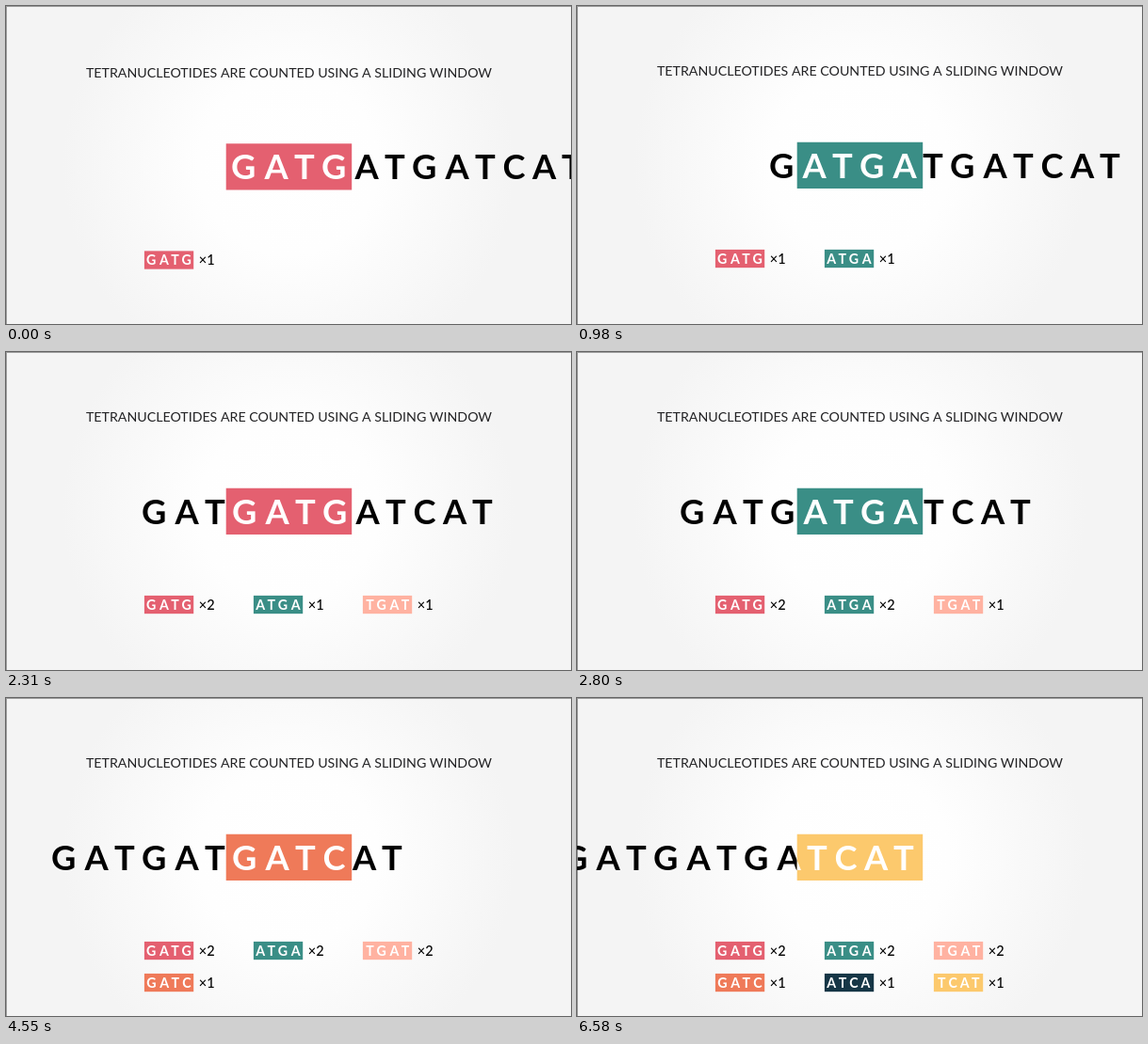
Recreate the animation shown at these times as an HTML page with a canvas. Size 600x338 px, loop 6650 ms.

```html
<!DOCTYPE html>
<html lang="en">
<head>
<meta charset="utf-8">
<title>Sliding window</title>
<style>
  html, body { margin: 0; width: 100%; height: 100%; overflow: hidden; background: #f4f4f4; }
  canvas { display: block; width: 600px; height: 338px; }
</style>
</head>
<body>
<canvas id="stage" width="600" height="338"></canvas>
<script>
const ctx = document.getElementById('stage').getContext('2d');
const LOOP = 6650;
const FIRST_MOVE = 329, STEP = 708, MOVE = 430, FADE = 500, TINT = 300;

const SEQUENCE = 'GATGATGATCAT';
// Centre of each letter, measured from the centre of the first one
const OFFSETS = [0, 35, 65, 96, 131, 161, 192, 227, 257, 288, 319.5, 349];
// Centre of the first letter while each window position is shown
const STOPS = [252, 217, 188, 157, 121, 92, 61, 25.5, -2];

const PINK = [228, 96, 112], TEAL = [58, 142, 134], PEACH = [255, 178, 161];
const ORANGE = [239, 122, 89], NAVY = [22, 54, 70], YELLOW = [252, 201, 109];
const TINTS = [PINK, TEAL, PEACH, PINK, TEAL, PEACH, ORANGE, NAVY, YELLOW];

const BOX = { x: 233.7, y: 144.7, w: 133.5, h: 49.2 };
const SMALL = 52.3 / BOX.w;
const LEGEND = [
  { first: 0, again: 3, x: 146.9, y: 258.9 },
  { first: 1, again: 4, x: 262.9, y: 258.9 },
  { first: 2, again: 5, x: 378.9, y: 258.9 },
  { first: 6, x: 146.9, y: 292.9 },
  { first: 7, x: 262.9, y: 292.9 },
  { first: 8, x: 378.9, y: 292.9 }
];

const BIG_FONT = '700 36.3px Lato, sans-serif';
const TITLE_FONT = '400 14.19px Lato, sans-serif';
const COUNT_FONT = '500 14.5px Lato, sans-serif';

const clamp = v => Math.min(1, Math.max(0, v));
const mix = (a, b, p) => a + (b - a) * p;
const ease = p => p < 0.5 ? 4 * p ** 3 : 1 - 4 * (1 - p) ** 3;
const rgb = c => `rgb(${c.map(Math.round).join()})`;

// Progress of the change into a given window position
function progress(t, state, length) {
  return state ? clamp((t - FIRST_MOVE - (state - 1) * STEP) / length) : 1;
}

function drawLetters(start, color, from = 0, to = SEQUENCE.length) {
  ctx.font = BIG_FONT;
  ctx.textAlign = 'left';
  ctx.fillStyle = color;
  for (let i = from; i < to; i++) {
    const m = ctx.measureText(SEQUENCE[i]);
    const middle = (m.actualBoundingBoxRight - m.actualBoundingBoxLeft) / 2;
    ctx.fillText(SEQUENCE[i], start + OFFSETS[i] - middle, 183);
  }
}

function drawBackground() {
  const g = ctx.createRadialGradient(300, 169, 0, 300, 169, 240);
  g.addColorStop(0, '#ffffff');
  g.addColorStop(0.4, '#fefefe');
  g.addColorStop(1, '#f4f4f4');
  ctx.fillStyle = g;
  ctx.fillRect(0, 0, 600, 338);
  ctx.fillStyle = '#9c9c9c';
  ctx.fillRect(0, 0, 600, 1);
  ctx.fillRect(0, 0, 1, 338);
}

function drawStrip(t) {
  let start = STOPS[0], tint = TINTS[0];
  for (let s = 1; s < STOPS.length; s++) {
    start = mix(start, STOPS[s], ease(progress(t, s, MOVE)));
    const p = ease(progress(t, s, TINT));
    tint = tint.map((v, i) => mix(v, TINTS[s][i], p));
  }
  drawLetters(start, '#000');
  ctx.save();
  ctx.beginPath();
  ctx.rect(BOX.x, BOX.y, BOX.w, BOX.h);
  ctx.fillStyle = rgb(tint);
  ctx.fill();
  ctx.clip();
  drawLetters(start, '#fff');
  ctx.restore();
}

function drawEntry(t, { first, again, x, y }) {
  const shown = progress(t, first, FADE);
  if (!shown) return;
  ctx.save();
  ctx.globalAlpha = shown;
  ctx.save();
  ctx.translate(x, y);
  ctx.scale(SMALL, SMALL);
  ctx.translate(-BOX.x, -BOX.y);
  ctx.fillStyle = rgb(TINTS[first]);
  ctx.fillRect(BOX.x, BOX.y, BOX.w, BOX.h);
  drawLetters(STOPS[first], '#fff', first, first + 4);
  ctx.restore();

  ctx.font = COUNT_FONT;
  ctx.textAlign = 'left';
  ctx.fillStyle = '#000';
  const cx = x + 57.9, cy = y + 14.9;
  const digitX = cx + ctx.measureText('×').width;
  const second = again ? progress(t, again, TINT) : 0;
  ctx.fillText('×', cx, cy);
  ctx.globalAlpha = shown * (1 - second);
  ctx.fillText('1', digitX, cy);
  ctx.globalAlpha = shown * second;
  ctx.fillText('2', digitX, cy);
  ctx.restore();
}

function draw(t) {
  drawBackground();
  ctx.save();
  // The page settles upwards slightly at the start
  ctx.translate(0, 1.5 * (1 - clamp(t / 200)) ** 2);
  ctx.font = TITLE_FONT;
  ctx.textAlign = 'center';
  ctx.fillStyle = '#232325';
  ctx.fillText('TETRANUCLEOTIDES ARE COUNTED USING A SLIDING WINDOW', 300.5, 74.3);
  drawStrip(t);
  LEGEND.forEach(entry => drawEntry(t, entry));
  ctx.restore();
}

const begin = performance.now();
function tick() {
  draw((performance.now() - begin) % LOOP);
  requestAnimationFrame(tick);
}
tick();
</script>
</body>
</html>
```
